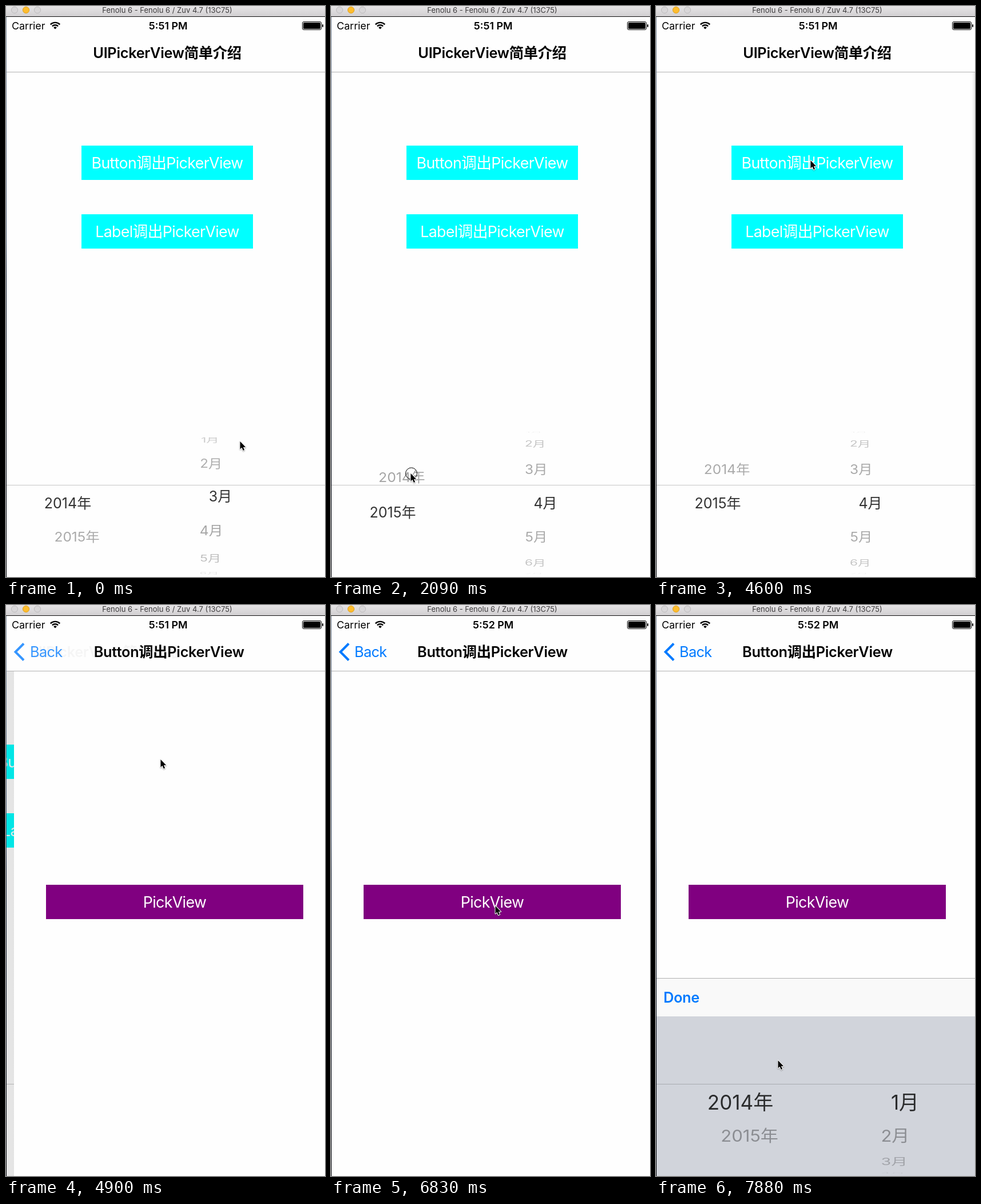
Write an HTML page with a canvas that moves like this. It is 558 by 998 pixels and loops after 8 s.

```html
<!DOCTYPE html>
<html lang="zh">
<head>
<meta charset="utf-8">
<title>Picker view demo</title>
<style>
  html, body { margin: 0; width: 100%; height: 100%; overflow: hidden; background: #fefefe; }
  canvas { display: block; }
</style>
</head>
<body>
<canvas id="stage" width="558" height="998"></canvas>
<script>
const ctx = document.getElementById('stage').getContext('2d');
const W = 558, H = 998, LOOP = 8000, STEP = 148.7;
const FAMILY = 'Inter, "Noto Sans CJK SC", "Noto Sans CJK", "Noto Sans", sans-serif';
const BLUE = '#007aff', PAPER = '#fefefe';
const BOLD = { weight: 600, track: -0.012 };

const YEARS = ['2014年', '2015年'];
const MONTHS = Array.from({ length: 12 }, (_, i) => `${i + 1}月`);

const clamp = v => Math.min(1, Math.max(0, v));
const easeOut = (u, power = 3) => 1 - (1 - clamp(u)) ** power;
const span = (t, start, length) => (t - start) / length;

// Pointer path: time, x, y of the arrow tip
const PATH = [
  [0, 409, 761], [300, 392, 742], [600, 300, 722], [1045, 176, 800],
  [1490, 140, 865], [1640, 139, 862], [2082, 139, 817], [2240, 139, 795],
  [2390, 139, 781], [2540, 140, 779], [2830, 158, 815], [3420, 172, 851],
  [3570, 172, 851], [4250, 270, 270], [5060, 270, 270], [5750, 287, 526],
  [7590, 287, 526], [7881, 213, 796]
];
const PRESSES = [[1480, 2500], [4400, 4550], [6500, 6750]];

function pointerAt(t) {
  const i = PATH.findIndex(p => p[0] > t);
  if (i < 0) return PATH[PATH.length - 1].slice(1);
  const [t0, x0, y0] = PATH[i - 1], [t1, x1, y1] = PATH[i];
  const u = (t - t0) / (t1 - t0);
  return [x0 + (x1 - x0) * u, y0 + (y1 - y0) * u];
}

function yearPosition(t) {
  if (t < 1490) return 0;
  const held = Math.min(t, 2500);
  const raw = (865 - pointerAt(held)[1]) / 64;
  const pos = raw > 1 ? 1 + (raw - 1) / 2 : raw;
  return pos + (1 - pos) * easeOut(span(t, 2500, 500));
}

const monthPosition = t => 2.2 + 0.8 * easeOut(span(t, 0, 900), 2);

function rect(x, y, w, h, color) {
  ctx.fillStyle = color;
  ctx.fillRect(x, y, w, h);
}

function clipped(x, y, w, h, draw) {
  ctx.save();
  ctx.beginPath();
  ctx.rect(x, y, w, h);
  ctx.clip();
  draw();
  ctx.restore();
}

function text(str, x, y, size, color, { weight = 400, align = 'center', track = 0, alpha = 1 } = {}) {
  ctx.save();
  ctx.globalAlpha *= clamp(alpha);
  ctx.font = `${weight} ${size}px ${FAMILY}`;
  ctx.letterSpacing = `${track * size}px`;
  ctx.textAlign = align;
  ctx.fillStyle = color;
  ctx.fillText(str, x, y);
  ctx.restore();
}

function button(label, x, y, w, color) {
  rect(x, y, w, 60, color);
  text(label, x + w / 2, y + 39.5, 26.8, '#fff', { track: -0.025 });
}

// One drum: side rows curve away, the middle band is a flat lens
function wheel(items, pos, { x, shift, size, small }) {
  const mid = 869, radius = 124, angle = 0.495;
  const row = (str, cx, cy, sx, sy, px, alpha) => {
    ctx.save();
    ctx.translate(cx, cy);
    ctx.scale(sx, sy);
    text(str, 0, px * 0.36, px, '#000', { alpha });
    ctx.restore();
  };
  const sides = () => items.forEach((str, i) => {
    const a = (i - pos) * angle, c = Math.cos(a);
    if (Math.abs(a) > 1.55) return;
    const depth = 1 - c;
    const cx = x + shift + Math.sign(shift) * 5 * depth;
    row(str, cx, mid + radius * Math.sin(a), 1 / (1 + 0.25 * depth), c, small, 0.37 * c ** 0.8);
  });
  clipped(0, 738, W, 99, sides);
  clipped(0, 901, W, 110, sides);
  clipped(0, 838, W, 63, () => items.forEach((str, i) => {
    const d = i - pos;
    if (Math.abs(d) < 1) row(str, x, mid + 62 * d, 1, 1, size, 0.8);
  }));
}

function homeView(t) {
  rect(1, 116, 557, 882, PAPER);
  button('Button调出PickerView', 132, 244, 300, '#00ffff');
  button('Label调出PickerView', 132, 364, 300, '#00ffff');
  wheel(YEARS, yearPosition(t), { x: 108, shift: 15.5, size: 25, small: 25.2 });
  wheel(MONTHS, monthPosition(t), { x: 375, shift: -15.5, size: 25, small: 25.2 });
  rect(1, 837, 557, 1, '#c6c6c6');
}

function detailView(left, rest) {
  const shade = ctx.createLinearGradient(left - 6, 0, left, 0);
  shade.addColorStop(0, 'rgba(0,0,0,0)');
  shade.addColorStop(1, `rgba(0,0,0,${0.09 * rest})`);
  rect(left - 6, 116, 6, 882, shade);
  rect(left, 116, 557, 882, PAPER);
  button('PickView', left + 56, 489, 450, '#800080');
}

function pickerSheet(rise) {
  ctx.save();
  ctx.translate(0, Math.round(346 * (1 - rise)));
  rect(1, 652, 557, 67, '#f9f9f9');
  rect(1, 652, 557, 1, '#b0b0b0');
  text('Done', 13, 695, 25.3, BLUE, { ...BOLD, align: 'left' });
  rect(1, 719, 557, 290, '#d1d4db');
  wheel(YEARS, 0, { x: 147.5, shift: 15.5, size: 35, small: 32 });
  wheel(MONTHS, 0, { x: 435.5, shift: -16.5, size: 35, small: 32 });
  rect(1, 837, 557, 1, '#a9abb0');
  ctx.restore();
}

function wifi(x, y) {
  const from = -Math.PI * 0.75, to = -Math.PI * 0.25;
  ctx.strokeStyle = ctx.fillStyle = '#000';
  ctx.lineWidth = 2.4;
  for (const r of [7.2, 11.6]) {
    ctx.beginPath();
    ctx.arc(x, y, r, from, to);
    ctx.stroke();
  }
  ctx.beginPath();
  ctx.moveTo(x, y);
  ctx.arc(x, y, 4, from, to);
  ctx.fill();
}

function battery() {
  ctx.strokeStyle = ctx.fillStyle = '#000';
  ctx.lineWidth = 1;
  ctx.beginPath();
  ctx.roundRect(518.5, 27.5, 33, 14, 2.5);
  ctx.stroke();
  ctx.beginPath();
  ctx.roundRect(520, 29, 30, 11, 1.5);
  ctx.fill();
  ctx.beginPath();
  ctx.roundRect(553, 32, 2, 5, 1);
  ctx.fill();
}

function header(t, push) {
  const rest = 1 - push;
  rect(1, 19, 557, 96, PAPER);
  rect(1, 115, 557, 1, '#b2b2b2');
  if (rest > 0) {
    text('UIPickerView简单介绍', 282 - 110 * push, 91, 25.3, '#000', { ...BOLD, alpha: rest ** 0.9 });
  }
  if (push > 0) {
    const alpha = 1 - 3 * rest ** 0.7;
    text('Button调出PickerView', 282.5 + 115 * rest, 91, 25.3, '#000', { ...BOLD, alpha: push });
    text('Back', 41 + 45 * rest, 91, 25.3, BLUE, { align: 'left', track: -0.025, alpha });
    ctx.save();
    ctx.globalAlpha = clamp(alpha);
    ctx.strokeStyle = BLUE;
    ctx.lineWidth = 4;
    ctx.beginPath();
    ctx.moveTo(31, 67.5);
    ctx.lineTo(16.5, 82);
    ctx.lineTo(31, 96.5);
    ctx.stroke();
    ctx.restore();
  }
  text('Carrier', 10, 41, 17.9, '#000', { align: 'left' });
  text(t < 5350 ? '5:51 PM' : '5:52 PM', 283.7, 41, 17.9, '#000', { weight: 600 });
  wifi(86, 40.5);
  battery();
}

function windowFrame() {
  const bar = ctx.createLinearGradient(0, 0, 0, 18);
  bar.addColorStop(0, '#e6e4e6');
  bar.addColorStop(1, '#d2d0d2');
  rect(0, 0, W, 18, bar);
  rect(0, 18, W, 1, '#111');
  const edge = ctx.createLinearGradient(0, 19, 0, H);
  edge.addColorStop(0, '#8a97a8');
  edge.addColorStop(0.4, '#46566e');
  edge.addColorStop(0.46, '#1e2a3e');
  edge.addColorStop(1, '#05070c');
  rect(0, 19, 1, H, edge);
  [['#d8d6d8', '#bdbbbd'], ['#fdbd2f', '#dfa023'], ['#d8d6d8', '#bdbbbd']].forEach(([fill, line], i) => {
    ctx.beginPath();
    ctx.arc(15 + 20 * i, 7, 5.6, 0, 7);
    ctx.fillStyle = fill;
    ctx.fill();
    ctx.strokeStyle = line;
    ctx.lineWidth = 1;
    ctx.stroke();
  });
  text('Fenolu 6 - Fenolu 6 / Zuv 4.7 (13C75)', 282, 12, 13, '#3c3a3c');
}

const ARROW = new Path2D('M0 0V13.6L3 10.8L5.3 16L7.6 15L5.4 10H9.6Z');

function pointer(t) {
  const [x, y] = pointerAt(t);
  if (PRESSES.some(([from, to]) => t >= from && t < to)) {
    ctx.beginPath();
    ctx.arc(x + 1.5, y, 10, 0, 7);
    ctx.strokeStyle = '#000';
    ctx.lineWidth = 1;
    ctx.stroke();
  }
  ctx.save();
  ctx.translate(x + 0.5, y);
  ctx.lineJoin = 'round';
  ctx.lineWidth = 2;
  ctx.strokeStyle = '#fff';
  ctx.shadowColor = 'rgba(0,0,0,.35)';
  ctx.shadowBlur = 2;
  ctx.shadowOffsetY = 1;
  ctx.stroke(ARROW);
  ctx.shadowColor = 'transparent';
  ctx.fillStyle = '#000';
  ctx.fill(ARROW);
  ctx.restore();
}

function draw(t) {
  const push = easeOut(span(t, 4610, 415));
  const rise = easeOut(span(t, 6930, 500));
  rect(0, 0, W, H, PAPER);
  clipped(1, 116, 557, 882, () => {
    if (push < 1) {
      ctx.save();
      ctx.translate(-167 * push, 0);
      homeView(t);
      ctx.restore();
      rect(1, 116, 557, 882, `rgba(0,0,0,${0.1 * push})`);
    }
    if (t > 4600) detailView(1 + Math.round(557 * (1 - push)), 1 - push);
    if (rise > 0) pickerSheet(rise);
  });
  header(t, push);
  windowFrame();
  pointer(t);
}

const start = performance.now();
function tick() {
  const t = (performance.now() - start) % LOOP;
  draw(Math.floor(t / STEP + 0.08) * STEP);
  requestAnimationFrame(tick);
}
tick();
</script>
</body>
</html>
```
